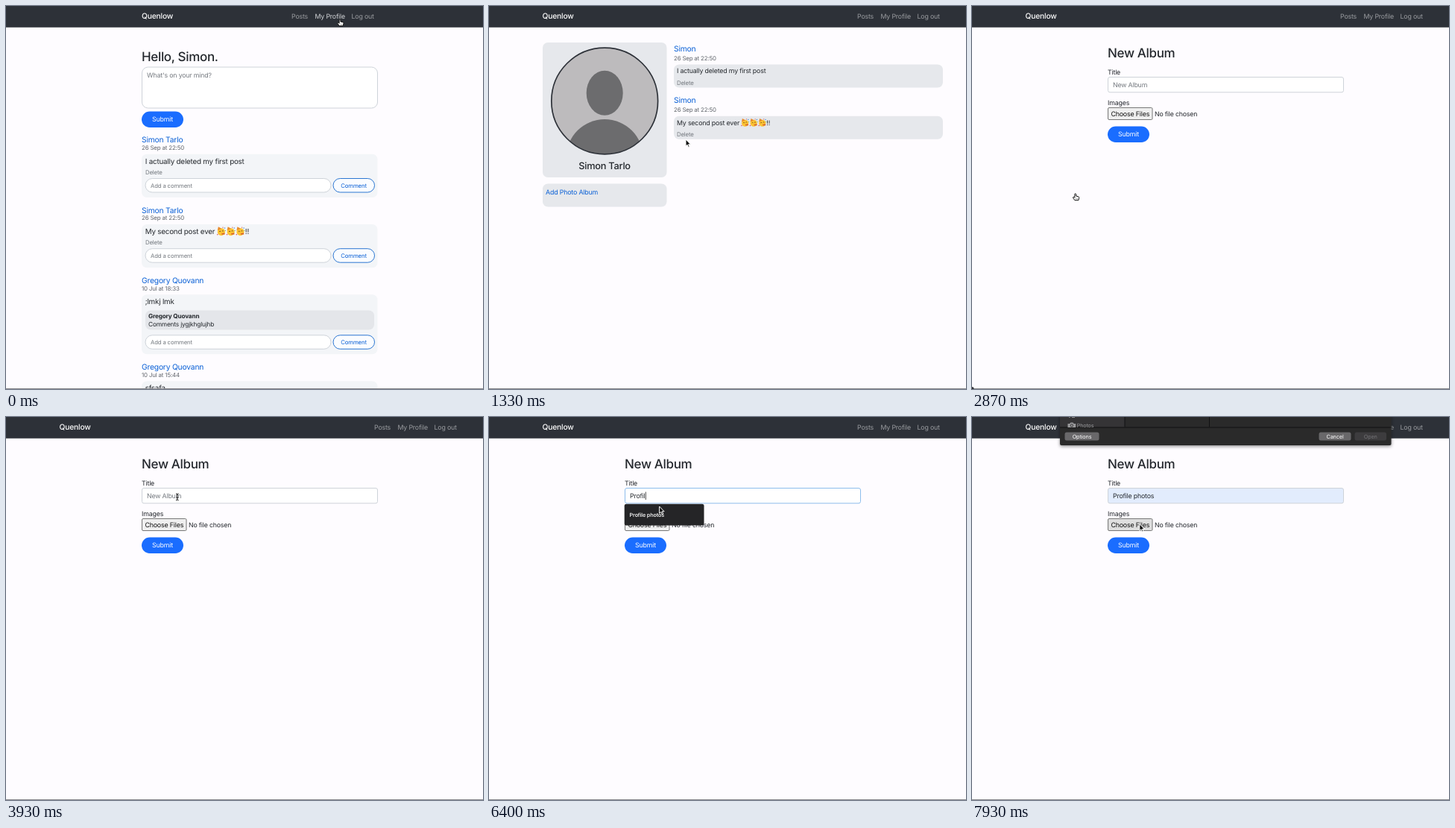
An HTML page for the animation above (8000 ms loop, 640x514 px).

```html
<!DOCTYPE html>
<html lang="en">
<head>
<meta charset="utf-8">
<title>Album walkthrough</title>
<style>
  html, body { margin: 0; width: 100%; height: 100%; overflow: hidden; background: #fefcff; }
  svg { display: block; }
  text { font-family: Inter, "Open Sans", sans-serif; letter-spacing: -0.02em; text-rendering: geometricPrecision; white-space: pre; }
</style>
</head>
<body>
<svg id="stage" width="640" height="514" viewBox="0 0 640 514"></svg>
<script>
const LOOP = 8000;
const INK = '#24282d', MUTED = '#74797f', LINK = '#0a60d6', BLUE = '#1a6dff';
const CARD = '#e6e8ec', POST = '#f3f5f8', BORDER = '#ced3d9', NAV = '#2d3138';
const BRAND = 'Quenlow', FIRST = 'Simon', USER = 'Simon Tarlo', FRIEND = 'Gregory Quovann';

const text = (x, y, size, content, fill = INK, extra = '') =>
  `<text x="${x}" y="${y}" font-size="${size}" fill="${fill}" ${extra}>${content}</text>`;
const centered = (x, y, size, content, fill, weight = 400) =>
  text(x, y, size, content, fill, `text-anchor="middle" font-weight="${weight}"`);
const box = (x, y, w, h, r, fill, stroke = 'none', extra = '') =>
  `<rect x="${x}" y="${y}" width="${w}" height="${h}" rx="${r}" fill="${fill}" stroke="${stroke}" ${extra}/>`;
const group = (id, content) => `<g id="${id}">${content}</g>`;
const heading = (y, content) => text(182, y, 17, content, INK, 'font-weight="500"');
const submitButton = y => box(182, y, 56, 21.5, 10.75, BLUE) + centered(210, y + 13.8, 8.8, 'Submit', '#fff');

function navbar(brandX, linkX, profileColor) {
  const gray = '#9a9ca0';
  return box(0, 0, 640, 28.7, 0, NAV)
    + text(brandX, 17.2, 10.3, BRAND, '#fff', 'font-weight="500"')
    + text(linkX, 16.8, 8.8, 'Posts', gray)
    + text(linkX + 31.5, 16.8, 8.8, 'My Profile', profileColor || gray)
    + text(linkX + 80.5, 16.8, 8.8, 'Log out', gray);
}

// Three partying faces followed by exclamation marks
function partyFaces(x, y, size, step) {
  const faces = [0, 1, 2].map(i => `<use href="#party" transform="translate(${x + i * step} ${y}) scale(${size / 12})"/>`);
  return faces.join('');
}

const commentRow = y =>
  box(187, y, 249, 18.5, 9.25, '#fff', BORDER) + text(194, y + 12.2, 7.75, 'Add a comment', MUTED)
  + box(439, y, 55.5, 18.5, 9.25, '#fafcff', '#2b76d2') + centered(466.5, y + 12.2, 7.8, 'Comment', LINK);

const feedPost = (y, author, date, height, message) =>
  text(182, y, 10.3, author, LINK) + text(182, y + 9.6, 7.9, date, '#60656b')
  + box(182, y + 15.3, 316.5, height, 7, POST) + text(186.7, y + 28.2, 9.8, message);

const feedPage = navbar(182, 383, '#d3d5d8')
  + heading(74, `Hello, ${FIRST}.`)
  + box(182.5, 82, 316, 55, 8, '#fff', BORDER) + text(189, 95.6, 8.8, "What's on your mind?", MUTED)
  + submitButton(141.5)
  + feedPost(183.4, USER, '26 Sep at 22:50', 58.3, 'I actually deleted my first post')
  + text(187, 225.5, 7.8, 'Delete', MUTED) + commentRow(231.5)
  + feedPost(277.6, USER, '26 Sep at 22:50', 58.3, 'My second post ever')
  + partyFaces(282.5, 296, 12.3, 12.8) + text(320.8, 305.8, 9.8, '!!')
  + text(187, 319.8, 7.8, 'Delete', MUTED) + commentRow(325.7)
  + feedPost(372, FRIEND, '10 Jul at 18:33', 80, ';lmkj lmk')
  + box(187, 408.5, 307, 26, 7, '#e4e6ea')
  + text(191, 418.6, 8.2, FRIEND, INK, 'font-weight="700"')
  + text(191, 430, 8.3, 'Comments jygjkhglujhb') + commentRow(441.8)
  + feedPost(488.2, FRIEND, '10 Jul at 15:44', 58, 'sfsafa');

const profilePost = (y, message) =>
  text(248, y, 10.3, FIRST, LINK) + text(248, y + 12.2, 7.85, '26 Sep at 22:50', '#60656b')
  + box(248, y + 17.5, 361, 31, 7, CARD) + text(252, y + 29.4, 8.8, message)
  + text(252, y + 45.2, 7.8, 'Delete', MUTED);

const profilePage = navbar(71.5, 494)
  + box(72, 49, 166.5, 181, 7, CARD)
  + `<g clip-path="url(#avatar)">${box(80, 50, 150, 150, 0, '#bdbbbd')}
      <ellipse cx="155.2" cy="116.7" rx="24.5" ry="30" fill="#6c6c6e"/>
      <circle cx="155.2" cy="203.5" r="51.5" fill="#6c6c6e"/></g>
    <circle cx="155.2" cy="127.5" r="71.4" fill="none" stroke="${NAV}" stroke-width="1.7"/>`
  + centered(155, 218.5, 12.8, USER, INK, 500)
  + box(72, 238.5, 166.5, 31, 7, CARD) + text(76, 253.3, 8.85, 'Add Photo Album', LINK, 'id="albumLink"')
  + profilePost(61, 'I actually deleted my first post')
  + profilePost(130.2, 'My second post ever')
  + partyFaces(337.8, 150.7, 11.2, 11.6) + text(372.3, 159.6, 8.8, '!!');

const dropdownRow = (y, label) => text(188.6, y, 7.2, label, '#eee', 'font-weight="600"');
const albumPage = navbar(71.5, 494)
  + heading(69, 'New Album')
  + text(182, 91.6, 8.8, 'Title')
  + box(182.5, 95.5, 316, 20.3, 2.5, '#fff', BORDER, 'id="field"') + text(189, 109, 8.8, '', INK, 'id="fieldText"')
  + text(182, 132.6, 8.8, 'Images')
  + box(182.5, 136.5, 59.5, 16, 1.5, '#efefef', '#777', 'id="fileButton"')
  + centered(212.3, 147.7, 8.85, 'Choose Files', '#111') + text(245, 147.7, 8.75, 'No file chosen')
  + submitButton(161.5)
  + group('dropdown', box(181.7, 116.8, 106.8, 28.8, 2.5, '#252527', 'none', 'id="dropdownBox"')
    + box(181.7, 122.5, 106.8, 17, 0, '#45464a', 'none', 'id="dropdownHover"')
    + dropdownRow(133.8, 'Profile photos')
    + group('otherRows', ['Holiday', 'Family', 'Garden', 'Weekend', 'Summer', 'Friends']
      .map((label, i) => dropdownRow(150.7 + i * 16.9, label)).join('')))
  + `<rect id="caret" y="100.5" width=".8" height="10.5" fill="#222"/>`;

const sheetButton = (x, w, label, fill, ink) =>
  box(x, 20.5, w, 11, 2.5, fill) + centered(x + w / 2, 28.7, 7.3, label, ink);
const fileSheet = box(118, -20, 444.5, 58, 2, '#2a292b', 'none', 'filter="url(#shadow)"')
  + box(118, 0, 87, 13.5, 0, '#353436')
  + `<path d="M205 0V13.5M318.5 0V13.5M118 14H562.5" stroke="#111113"/>`
  + `<path d="M130 0h1.6M134 0h4" stroke="#aaa" stroke-width="1.5"/>`
  + `<path d="M128.5 9h2.7l1-1.5h3.4l1 1.5h2.6v5h-10.7z" fill="#99999b"/><circle cx="133.8" cy="11.4" r="1.7" fill="#99999b" stroke="#353436"/>`
  + text(140.7, 13.5, 7.2, 'Photos', '#99999b')
  + sheetButton(124.5, 46, 'Options', '#69686a', '#fff')
  + sheetButton(465.5, 43, 'Cancel', '#69686a', '#fff')
  + sheetButton(513.5, 42.5, 'Open', '#3d3c3e', '#747376');

const outline = 'stroke-linejoin="round" stroke-width="1"';
const pointers =
  group('arrow', `<path d="M0 0V9.2L2.1 7.3L3.6 10.6L5.1 9.9L3.6 6.8H6.5Z" fill="#111" stroke="#fff" ${outline} stroke-width=".8"/>`)
  + group('hand', `<path d="M-.9 .8Q0 -.4 .9 .8V3.5L4.3 4.4Q5.2 4.8 4.9 6.2L4.2 9.2H-.8L-3.3 5.6Q-3 4.2 -1.6 5.1L-.9 5.8Z" fill="#fff" stroke="#111" ${outline}/><path d="M1 6.2V8M2.7 6.3V8" stroke="#333" stroke-width=".5"/>`)
  + group('ibeam', `<path d="M-1.8 -4.4Q0 -4.4 0 -3.2Q0 -4.4 1.8 -4.4M0 -3.2V3.2M-1.8 4.4Q0 4.4 0 3.2Q0 4.4 1.8 4.4M-1.2 1H1.2" fill="none" stroke="#111" stroke-width="1"/>`);

document.getElementById('stage').innerHTML = `<defs>
    <clipPath id="avatar"><circle cx="155.2" cy="127.5" r="71.4"/></clipPath>
    <filter id="shadow" x="-5%" y="-20%" width="110%" height="150%"><feDropShadow dx="0" dy="1.5" stdDeviation="2" flood-opacity=".45"/></filter>
    <g id="party">
      <circle cx="6.2" cy="7" r="4.9" fill="#fbc334"/>
      <path d="M1.2 5.2L2.3 .2L6.6 2.6Z" fill="#e8892b"/>
      <path d="M3.6 6.6Q4.5 5.6 5.4 6.5M7.2 6Q8.2 5 9 5.9" fill="none" stroke="#6b3d12" stroke-width=".9"/>
      <path d="M6.4 9L10.6 8.2L11 10.2L7 10.4Z" fill="#d9632c"/>
      <circle cx="10.7" cy="2" r=".8" fill="#4b98d8"/><circle cx="8.3" cy="1.2" r=".6" fill="#d94b52"/>
      <circle cx="1.2" cy="10.5" r=".8" fill="#d94b52"/><circle cx="11.5" cy="5.2" r=".6" fill="#59a94c"/>
    </g></defs>`
  + box(0, 0, 640, 514, 0, '#fefcff')
  + group('feed', feedPage) + group('profile', profilePage) + group('album', albumPage) + group('sheet', fileSheet)
  + `<path d="M0 513.5H640" stroke="#8b8b8f"/>`
  + `<rect id="status" x="-3" y="511.3" height="6" rx="2" fill="#303135"/>`
  + group('pointer', pointers);

const $ = id => document.getElementById(id);
const show = (id, visible) => { $(id).style.display = visible ? '' : 'none'; };
const set = (id, attributes) => Object.entries(attributes).forEach(([name, value]) => $(id).setAttribute(name, value));
const within = (t, from, to) => t >= from && t < to;

// Pointer stops: time, x, y
const route = [
  [0, 448, 17.5], [930, 448, 17.5], [1070, 370, 80], [1200, 190, 241], [1270, 124, 215], [1330, 264, 179],
  [1530, 264, 179], [1800, 364, 115], [1930, 335, 56], [2130, 205, 150], [2400, 138, 250], [2600, 138.7, 251.5],
  [3070, 138.7, 251.5], [3400, 185, 165], [3670, 224, 92], [3930, 229.8, 107.3],
  [6130, 229.8, 107.3], [6400, 228.6, 120], [6530, 228, 130], [6930, 228, 130], [7400, 224.8, 143.5], [LOOP, 224.8, 143.5]
];
function pointerAt(t) {
  const next = Math.max(1, route.findIndex(stop => stop[0] > t));
  const [t0, x0, y0] = route[next - 1], [t1, x1, y1] = route[next];
  const k = (t - t0) / (t1 - t0);
  return [x0 + (x1 - x0) * k, y0 + (y1 - y0) * k];
}

const keyTimes = [5000, 5400, 5530, 5600, 5730, 5930];

function snap(t) {
  const rest = t % 200;
  return t - rest + (rest >= 130 ? 130 : rest >= 70 ? 70 : 0);
}

function drawForm(t) {
  const typed = keyTimes.filter(time => time <= t).length;
  const filled = t >= 6470;
  const focused = within(t, 4530, 7530);
  const value = filled ? 'Profile photos' : 'Profil'.slice(0, typed);
  $('fieldText').textContent = value || 'New Album';
  set('fieldText', { fill: value ? INK : MUTED });
  set('field', { fill: filled ? '#e2ecfd' : '#fff', stroke: focused ? '#8dbdec' : BORDER });
  set('fileButton', { fill: t >= 7330 ? '#dedede' : '#efefef' });

  show('caret', focused && t < 6470);
  set('caret', { x: value ? 189.3 + $('fieldText').getComputedTextLength() : 189 });

  const full = t < 5070;
  show('dropdown', within(t, 4600, 6730));
  set('dropdown', { opacity: t >= 6670 ? 0.5 : 1 });
  set('dropdownBox', { height: full ? 130 : 28.8 });
  show('otherRows', full);
  show('dropdownHover', within(t, 6470, 6730));
}

function draw(now) {
  const t = snap(now % LOOP);
  show('feed', t < 70);
  show('profile', within(t, 70, 2870));
  show('album', t >= 2870);
  show('sheet', t >= 7930);

  const hovering = within(t, 2400, 2870);
  set('albumLink', { fill: hovering ? '#0a459c' : LINK, 'text-decoration': hovering ? 'underline' : 'none' });
  if (t >= 2870) drawForm(t);

  show('status', within(t, 200, 730) || within(t, 2730, 3200));
  set('status', { width: t < 1000 ? 189 : 5.5, opacity: within(t, 600, 730) ? (730 - t) / 200 : 1 });

  const [x, y] = pointerAt(t);
  const overField = t >= 2870 && x > 182 && within(y, 95, 116);
  const shape = t < 270 || within(t, 2400, 3130) ? 'hand' : overField ? 'ibeam' : 'arrow';
  ['arrow', 'hand', 'ibeam'].forEach(id => show(id, id === shape));
  show('pointer', !within(t, 5000, 6200));
  set('pointer', { transform: `translate(${x} ${y})` });
}

const start = performance.now();
function tick() {
  draw(performance.now() - start);
  requestAnimationFrame(tick);
}
tick();
</script>
</body>
</html>
```
